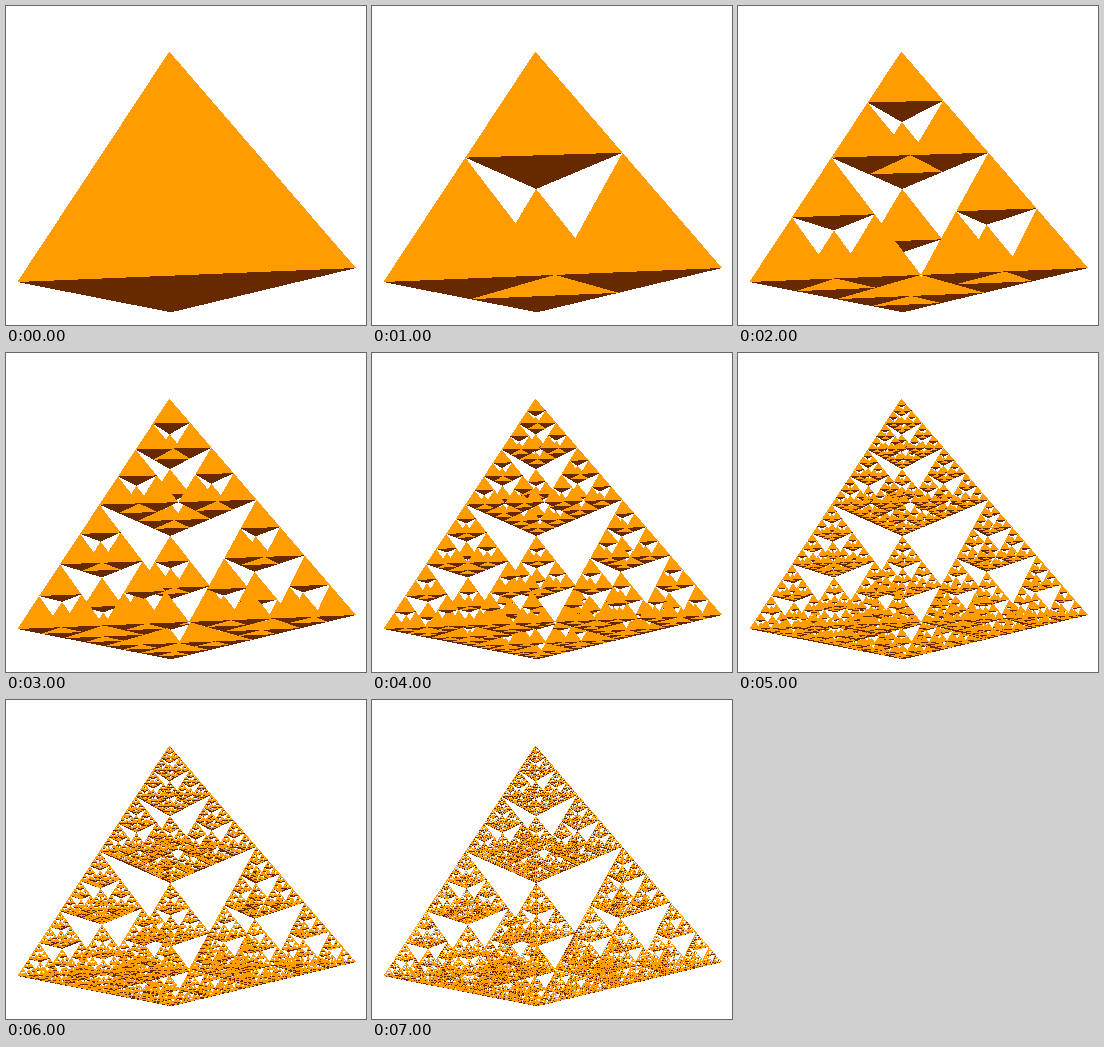
An HTML page with a canvas that plays this animation: 360x319 px, repeating every 8 s.

```html
<!DOCTYPE html>
<html lang="en">
<head>
<meta charset="utf-8">
<title>Sierpinski tetrahedron</title>
<style>
html, body { margin: 0; width: 100%; height: 100%; overflow: hidden; background: #fff; }
canvas { display: block; }
</style>
</head>
<body>
<canvas id="stage" width="360" height="319"></canvas>
<script>
const WIDTH = 360, HEIGHT = 319, LEVELS = 8, STEP = 1000;
const ctx = document.getElementById('stage').getContext('2d');
const image = ctx.createImageData(WIDTH, HEIGHT);
const pixels = new Uint32Array(image.data.buffer);
// Pixel colours in ABGR order
const WHITE = 0xffffffff, ORANGE = 0xff009dff, BROWN = 0xff002966;

// Homogeneous corners keep midpoints correct in perspective
const corner = (x, y, w) => [x * w, y * w, w];
const apex = corner(163.3, 45.5, 1.172);
const leftCorner = corner(11.3, 276, 1);
const rightCorner = corner(350, 262, 1.028);
const backCorner = corner(165, 306.3, 1.305);

const middle = (a, b) => a.map((v, i) => (v + b[i]) / 2);
const project = ([x, y, w]) => [x / w, y / w];

// Hard-edged triangle, sampled at pixel centres
function fillTriangle(points, color) {
  const ys = points.map(p => p[1]);
  const last = Math.min(HEIGHT - 1, Math.ceil(Math.max(...ys) - 0.5) - 1);
  for (let row = Math.max(0, Math.ceil(Math.min(...ys) - 0.5)); row <= last; row++) {
    const y = row + 0.5;
    let from = Infinity, to = -Infinity;
    for (let i = 0; i < 3; i++) {
      const [x1, y1] = points[i], [x2, y2] = points[(i + 1) % 3];
      if ((y1 <= y) === (y2 <= y)) continue;
      const x = x1 + (x2 - x1) * (y - y1) / (y2 - y1);
      from = Math.min(from, x);
      to = Math.max(to, x);
    }
    const start = Math.max(0, Math.ceil(from - 0.5));
    const end = Math.min(WIDTH, Math.ceil(to - 0.5));
    if (start < end) pixels.fill(color, row * WIDTH + start, row * WIDTH + end);
  }
}

// Corners are ordered far to near, so later parts cover earlier ones
function tetrahedron(corners, depth) {
  if (depth > 0) {
    for (const c of corners) tetrahedron(corners.map(other => middle(c, other)), depth - 1);
    return;
  }
  const [t, b, l, r] = corners.map(project);
  fillTriangle([l, r, b], BROWN);
  fillTriangle([t, l, r], ORANGE);
}

let shown = -1;
function frame() {
  const level = Math.floor(performance.now() / STEP) % LEVELS;
  if (level !== shown) {
    shown = level;
    pixels.fill(WHITE);
    tetrahedron([apex, backCorner, leftCorner, rightCorner], level);
    ctx.putImageData(image, 0, 0);
  }
  requestAnimationFrame(frame);
}
frame();
</script>
</body>
</html>
```
